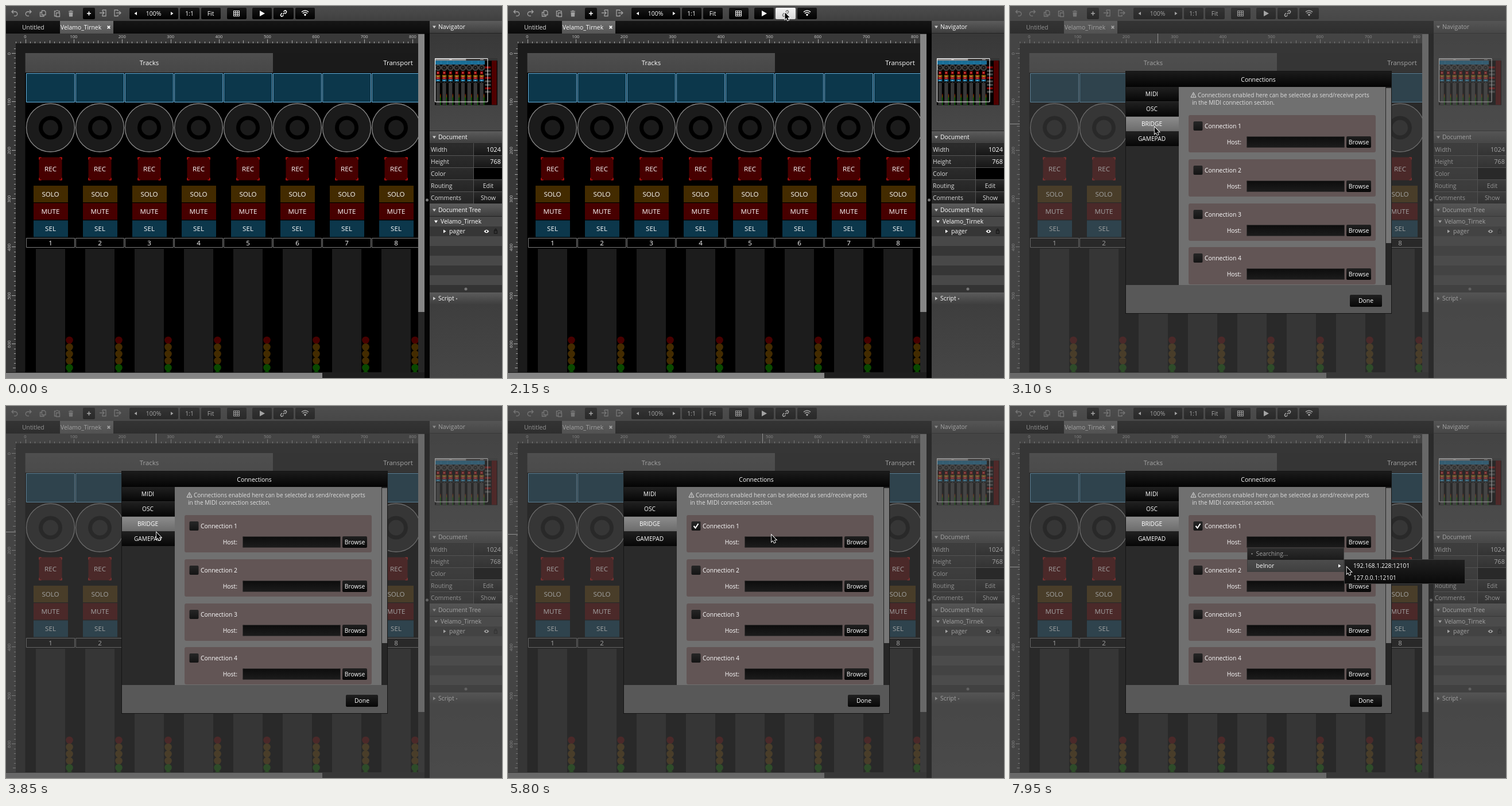
An HTML page with a canvas for the animation above (8000 ms loop, 864 by 648 pixels).

```html
<!DOCTYPE html>
<html lang="en">
<head>
<meta charset="utf-8">
<title>Connections</title>
<style>
html, body { margin: 0; width: 100%; height: 100%; overflow: hidden; background: #000; }
canvas { display: block; }
</style>
</head>
<body>
<canvas id="stage" width="864" height="648"></canvas>
<script>
const c = document.getElementById('stage').getContext('2d');
const LOOP = 8000, UI = 10.4, WIDGET = 11.6, DOC = 'Velamo_Tirnek', HOST = 'belnor';
const UNIT = 0.8437, PITCH = 86.05;

// ---- helpers ----
function rect(x, y, w, h, fill, fill2, r = 0) {
  c.fillStyle = fill;
  if (fill2) {
    const g = c.createLinearGradient(0, y, 0, y + h);
    g.addColorStop(0, fill);
    g.addColorStop(1, fill2);
    c.fillStyle = g;
  }
  c.beginPath();
  c.roundRect(x, y, w, h, r);
  c.fill();
}
function frame(x, y, w, h, color, r = 0, width = 1) {
  c.strokeStyle = color;
  c.lineWidth = width;
  c.beginPath();
  c.roundRect(x, y, w, h, r);
  c.stroke();
}
function disc(x, y, r, fill, line) {
  c.beginPath();
  c.arc(x, y, r, 0, 7);
  c.fillStyle = fill;
  c.fill();
  if (line) { c.strokeStyle = line; c.lineWidth = 1.3; c.stroke(); }
}
// y is the centre of the capitals
function text(s, x, y, color = '#fff', align = 'left', size = UI) {
  c.font = size + "px 'Open Sans', sans-serif";
  c.textAlign = align;
  c.fillStyle = color;
  c.fillText(s, x, y + size * 0.36);
}
const label = (s, x, y, size, color = '#fff') => text(s, x, y, color, 'center', size);
function icon(d, x, y, color, fill, width = 1.3) {
  c.save();
  c.translate(x, y);
  const p = new Path2D(d);
  c.fillStyle = c.strokeStyle = color;
  c.lineWidth = width;
  fill ? c.fill(p) : c.stroke(p);
  c.restore();
}
function clipped(x, y, w, h, draw) {
  c.save();
  c.beginPath();
  c.rect(x, y, w, h);
  c.clip();
  draw();
  c.restore();
}
const DOWN = 'M-3-2H3L0 2.5Z', RIGHT = 'M-2-3V3L2.5 0Z', LEFT = 'M2-3V3L-2.5 0Z';

// ---- toolbar and tabs ----
const LINK = 'M-1 1.5L2 -1.5M0-3L1.5-4.5A2.2 2.2 0 0 1 4.6-1.4L2.6.6M0 3L-1.5 4.5A2.2 2.2 0 0 1-4.6 1.4L-2.6-.6';
const SHEETS = 'M-2-2H-4.5V5H2V3M-1.5-5H3L5-3V2.5H-1.5Z';
function toolbar(pressed) {
  rect(0, 0, 864, 26, '#4c4c4c', '#404040');
  const dim = '#a0a0a0';
  icon('M-5-2H1a3.7 3.7 0 0 1 0 7.4H-1M-2-5L-5-2L-2 1', 15, 12, dim);
  icon('M5-2H-1a3.7 3.7 0 0 0 0 7.4H1M2-5L5-2L2 1', 39, 12, dim);
  icon(SHEETS, 64, 13, dim);
  icon('M-2 4.5H-4.5V-4H-2M2-4H4V-2M-1.5-5H1.5M-1.5-1H4.5V5.5H-1.5Z', 89, 13, dim);
  icon('M-4-3H4V-4.2H1.5V-5.3H-1.5V-4.2H-4ZM-3.5-2H3.5L3 5.5H-3Z', 113, 13, dim, true);
  for (const x of [169, 194]) {
    icon(x < 180 ? 'M-1-5H5V5.5H-1V3M-1-5V-3M-6 0H2M-1-3L2 0L-1 3' : 'M1-5H-5V5.5H1V3M1-5V-3M-2 0H6M3-3L6 0L3 3', x, 12, dim);
  }
  for (const [x, w] of [[134, 21], [215, 85], [303, 34], [340, 34], [385, 34], [429, 34], [466, 35], [504, 34]]) {
    const on = pressed && x == 466;
    rect(x, 3, w, 20, on ? '#f2f2f2' : '#171717', on ? '#d8d8d8' : '#000', 2);
  }
  icon('M-3.5 0H3.5M0-3.5V3.5', 144.5, 13, '#fff', false, 1.6);
  icon(LEFT, 226, 13, '#fff', true);
  icon(RIGHT, 289, 13, '#fff', true);
  label('100%', 257, 13);
  label('1:1', 319.5, 13);
  label('Fit', 356.5, 13);
  icon('M-5-4.5H5V4.5H-5ZM-5-1.5H5M-5 1.5H5M-1.7-4.5V4.5M1.7-4.5V4.5', 401.5, 13, '#eee', false, 1.1);
  icon('M-4-5V5L5 0Z', 446, 13, '#fff', true);
  icon(LINK, 483.5, 13, pressed ? '#777' : '#fff', false, 1.5);
  icon('M-6-1.5A8.5 8.5 0 0 1 6-1.5M-4 1A5.6 5.6 0 0 1 4 1M-1.6 3.3A2.4 2.4 0 0 1 1.6 3.3', 521, 12, '#fff', false, 1.6);
  disc(521, 16, 1.3, '#fff');
}
function tabs() {
  rect(0, 26, 738, 22, '#161616', '#0a0a0a');
  text('Untitled', 28, 37, '#ddd');
  rect(94, 26, 93, 22, '#707070', '#555');
  clipped(95, 26, 75, 22, () => text(DOC, 95, 37));
  icon('M-2.3-2.3L2.3 2.3M2.3-2.3L-2.3 2.3', 179, 37, '#fff', false, 1.7);
}

// ---- rulers ----
function rulers(mark) {
  rect(0, 48, 718, 17, '#383838');
  rect(0, 48, 17, 591, '#383838');
  for (const side of [0, 1]) {
    c.save();
    if (side) { c.beginPath(); c.rect(0, 66, 17, 572); } else { c.beginPath(); c.rect(17, 48, 700, 17); }
    c.clip();
    if (side) c.transform(0, 1, 1, 0, 0, 0);
    const zero = side ? 82 : 33.5, edge = side ? 17 : 65;
    for (let u = -30; u <= 820; u += 10) {
      const len = u % 100 ? (u % 50 ? 3 : 5) : 7;
      rect(Math.round(zero + u * UNIT), edge - len, 1, len, '#aaa');
    }
    c.restore();
  }
  for (let u = 0; u <= 800; u += 100) {
    label(u, 33.5 + u * UNIT, 53, 7.5, '#ccc');
    if (u > 600) continue;
    c.save();
    c.translate(5, 83 + u * UNIT);
    c.rotate(-Math.PI / 2);
    label(u, 0, 0, 7.5, '#ccc');
    c.restore();
  }
  if (mark && mark.y > 48 && mark.x < 718) {
    rect(Math.round(mark.x), 48, 1, 17, '#ddd');
    rect(0, Math.round(mark.y), 17, 1, '#ddd');
  }
}

// ---- mixer page ----
function strip(i) {
  c.save();
  c.translate(Math.round(i * PITCH), 0);
  rect(35.5, 117.5, 84, 50, '#0c374b');
  frame(35.5, 117.5, 84, 50, '#6ab4e0');
  disc(77.5, 212, 42, '#1b1b1b', '#8a8a8a');
  disc(77.5, 212, 20.5, '#000');
  disc(77.5, 212, 13.5, '#1b1b1b');
  rect(57.5, 263.5, 40, 40, '#470000');
  icon('M.5 4V.5H4M36 .5H39.5V4M39.5 36V39.5H36M4 39.5H.5V36', 57.5, 263.5, '#e81818', false, 1.2);
  label('REC', 77.5, 283.5, WIDGET);
  const rows = [['SOLO', '#432b00'], ['MUTE', '#470000'], ['SEL', '#0c374b']];
  rows.forEach(([name, color], k) => {
    rect(48, 313 + k * 30.3, 60, 29, color);
    label(name, 77.5, 327.5 + k * 30.3, WIDGET);
  });
  rect(35.5, 404.5, 84, 16, '#000');
  frame(35.5, 404.5, 84, 16, '#7c7c7c');
  label(i + 1, 77.5, 412.5, WIDGET);
  rect(52, 423, 51, 303, '#1c1c1c');
  for (let k = 0; k < 13; k++) {
    disc(110.5, 582 + k * 12, 6.3, k ? (k < 4 ? '#432b00' : '#0a4800') : '#470000');
  }
  c.restore();
}
function page() {
  rect(33.5, 82, 864, 648, '#000');
  rect(465, 82, 432, 34, '#1a1a1a');
  rect(33.5, 82, 431.5, 34, '#4e4e4e', '#474747');
  label('Tracks', 249.5, 98.5, 11.4);
  label('Transport', 683, 98.5, 11.4);
  for (let i = 0; i < 8; i++) strip(i);
}
function editor(mark) {
  rect(0, 48, 738, 600, '#1b1b1b');
  clipped(17, 65, 701, 573, page);
  rulers(mark);
  rect(718, 48, 11, 591, '#262626');
  rect(718, 49, 11, 484, '#858585');
  rect(729, 26, 9, 622, '#050505');
  disc(733.5, 338, 2.5, '#777');
  rect(0, 638, 729, 10, '#1e1e1e');
  rect(0, 639, 551, 9, '#858585');
}

// ---- side panel ----
function header(name, y, closed) {
  rect(738, y, 126, 21, '#5c5c5c', '#3e3e3e');
  icon(closed ? RIGHT : DOWN, 746, y + 10.5, '#ccc', true, 1);
  text(name, 753, y + 10.5);
}
function thumbnail() {
  clipped(747, 91, 109, 83, () => {
    c.translate(747, 91);
    c.scale(0.1262, 0.1262);
    c.translate(-33.5, -82);
    page();
    for (let k = 0; k < 8; k++) rect(725, 195 + k * 48, 82, 28, k % 3 ? '#222' : '#400000');
    rect(818, 115, 70, 610, '#280000');
    // small scale keeps the colours vivid
    c.globalCompositeOperation = 'color-dodge';
    rect(33.5, 82, 864, 648, '#808080');
  });
  frame(747.5, 91.5, 91.5, 75.5, '#fff');
}
function sidebar() {
  rect(738, 26, 126, 622, '#222');
  rect(738, 48, 126, 169, '#383838', '#484848');
  header('Navigator', 26);
  thumbnail();

  header('Document', 218);
  ['Width', 'Height', 'Color', 'Routing', 'Comments'].forEach((name, i) => {
    const y = 239 + 21 * i;
    rect(738, y + 1, 76, 20, '#2c2c2c', '#252525');
    rect(815, y + 1, 49, 20, i == 2 ? '#000' : '#2a2a2a', i == 2 ? '#000' : '#161616');
    rect(738, y + 21, 126, 1, '#555');
    rect(814, y, 1, 21, '#555');
    text(name, 740, y + 11, '#ddd');
    if (i < 2) text(['1024', '768'][i], 862, y + 11, '#fff', 'right', 10.9);
    if (i > 2) label(['Edit', 'Show'][i - 3], 840, y + 11, UI, '#ddd');
  });

  header('Document Tree', 345);
  for (let i = 0; i < 7; i++) rect(738, 367 + 17 * i, 126, 17, i % 2 ? '#363636' : '#484848');
  icon(DOWN, 749, 375.5, '#fff', true);
  text(DOC, 757, 375.5);
  icon(RIGHT, 764, 392.5, '#fff', true);
  text('pager', 772, 392.5);
  icon('M-4.5 0Q0-5.5 4.5 0Q0 5.5-4.5 0', 837, 392.5, '#fff', true);
  disc(837, 392.5, 1.4, '#222');
  icon('M-2.5-1H2.5V3.5H-2.5ZM-1.5-1V-2.5A1.5 1.5 0 0 1 1.5-2.5V-1', 853, 392.5, '#1a1a1a', false, 1.3);
  rect(738, 486, 126, 13, '#333');
  disc(801, 493, 2.5, '#777');
  rect(738, 520, 126, 128, '#3e3e3e', '#464646');
  header('Script', 499, true);
  disc(785, 510, 1.2, '#aaa');
}

// ---- dialog ----
function button(name, x, y, w, h) {
  rect(x, y, w, h, '#202020', '#070707', 2);
  label(name, x + w / 2, y + h / 2);
}
function group(i, checked) {
  c.save();
  c.translate(0, Math.round(i * 76.8));
  rect(311, 190, 326, 65, '#625555', null, 3);
  rect(319.5, 201, 16, 16, '#262626', '#141414', 2);
  if (checked) icon('M-4 0L-1 3.5L4-4', 327.5, 209, '#fff', false, 2);
  text('Connection ' + (i + 1), 339, 209.5);
  text('Host:', 403, 237, '#fff', 'right');
  rect(412, 227, 171, 20, '#0c0c0c', '#1c1c1c', 2);
  frame(412.5, 227.5, 170, 19, '#3a3535', 2);
  button('Browse', 586, 227, 43, 20);
  c.restore();
}
function dialog(t) {
  rect(0, 0, 864, 648, 'rgba(80,80,80,.52)');
  rect(201, 113, 464, 423, '#141414');
  rect(202, 114, 462, 27, '#1b1b1b', '#040404');
  label('Connections', 432.5, 128);
  rect(202, 141, 92, 345, '#2a2a2a');
  ['MIDI', 'OSC', 'BRIDGE', 'GAMEPAD'].forEach((name, i) => {
    const on = i == 2, y = 141 + 26 * i;
    rect(202, y, 92, 25, on ? '#8c8c8c' : '#202020', on ? '#6c6c6c' : '#060606');
    label(name, 247, y + 12.5, 10.2);
  });
  rect(294, 141, 360, 345, '#707070');
  icon('M0-4.5L4.5 4H-4.5ZM0-1.5V1.5M0 2.2V3.2', 319.5, 155, '#ddd', false, 1);
  text('Connections enabled here can be selected as send/receive ports', 327, 155.5, '#ddd', 'left', 10);
  text('in the MIDI connection section.', 317, 168, '#ddd', 'left', 10);
  clipped(294, 141, 360, 345, () => {
    for (let i = 0; i < 4; i++) group(i, i == 0 && t >= 4850);
  });
  rect(654, 141, 10, 345, '#262626');
  rect(655, 143, 9, 270, '#777');
  rect(202, 486, 462, 49, '#585858');
  button('Done', 592, 503, 56, 21);
}
function menus(t) {
  if (t < 6400) return;
  const hover = t >= 7250;
  rect(413, 247, 169, 42, '#3c3c3c');
  rect(414, 248, 167, 40, hover ? '#2c2c2c' : '#242424', '#0a0a0a');
  if (hover) rect(414, 268, 167, 20, '#4c4c4c', '#404040');
  text('Searching...', 428.5, 257.5, '#a0a0a0');
  disc(420.3 + 1.3 * Math.cos(t / 90), 257 + 1.3 * Math.sin(t / 90), 1.1, '#aaa');
  text(HOST, 428.5, 278.5);
  icon(RIGHT, 574, 278.5, '#fff', true);
  if (t < 7450) return;
  rect(582, 267, 211, 43, '#3c3c3c');
  rect(583, 268, 209, 41, '#202020', '#0a0a0a');
  text('192.168.1.228:12101', 598, 278.5, '#fff', 'left', 10.2);
  text('127.0.0.1:12101', 598, 299.5, '#fff', 'left', 10.2);
}

// ---- pointer: time, x, y ----
const PATH = [
  [50, 610, 618], [850, 496, 34], [1300, 482, 11], [2150, 482, 11], [2200, 481, 10], [2650, 481, 10],
  [3150, 245, 216], [3450, 250, 212], [3900, 262, 220], [4250, 254, 214], [4650, 329, 212],
  [4950, 329, 212], [5250, 336, 212], [5550, 336, 212], [6100, 618, 240], [6250, 618, 241],
  [6900, 618, 241], [7250, 548, 270], [7600, 520, 272], [8000, 589, 280.5]
];
function pointer(t) {
  if (t < PATH[0][0]) return null;
  const k = PATH.findIndex(p => p[0] > t);
  const [t0, x0, y0] = PATH[k - 1], [t1, x1, y1] = PATH[k];
  const u = (t - t0) / (t1 - t0), s = u * u * (3 - 2 * u);
  return { x: x0 + (x1 - x0) * s, y: y0 + (y1 - y0) * s };
}
function cursor(p) {
  const shape = 'M.5 .5V12.2L3 9.8L5 14.2L7 13.3L5.1 9H8.7Z';
  icon(shape, p.x, p.y, '#fff', false, 1.8);
  icon(shape, p.x, p.y, '#000', true);
}

function draw(t) {
  const open = t >= 2200;
  editor(pointer(t - 20));
  tabs();
  sidebar();
  toolbar(t >= 2000 && !open);
  if (open) {
    dialog(t);
    menus(t);
  }
  const p = pointer(t);
  if (p) cursor(p);
}
function tick() {
  draw(performance.now() % LOOP);
  requestAnimationFrame(tick);
}
tick();
</script>
</body>
</html>
```
